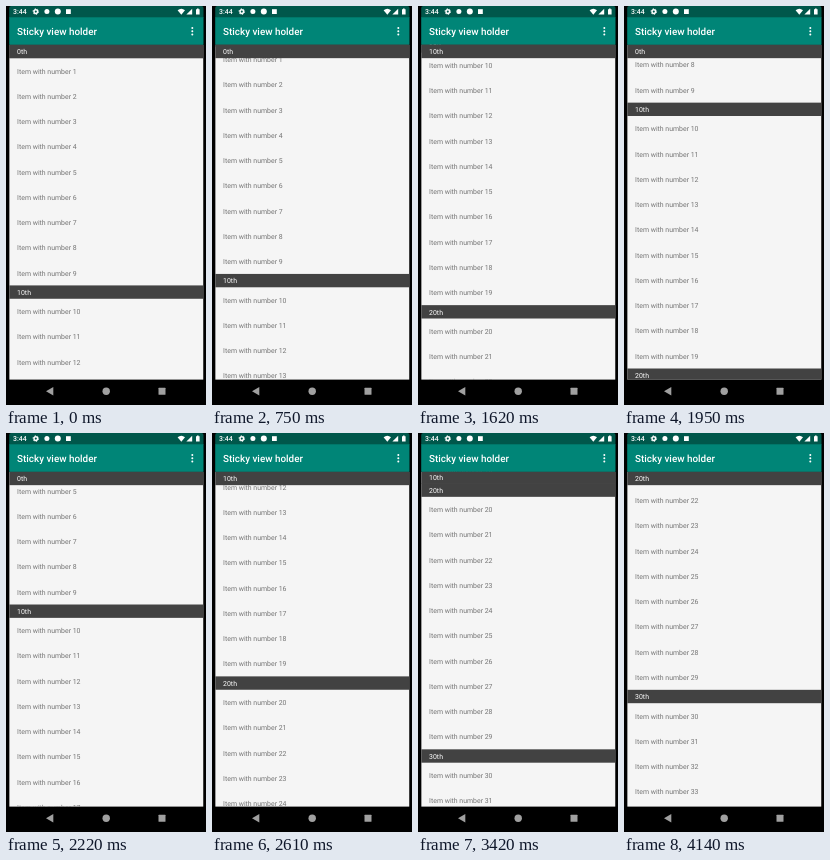
These frames come from a looping animation (200 px wide and 399 px high, 4.92 s). An HTML page:

```html
<!DOCTYPE html>
<html lang="en">
<head>
<meta charset="utf-8">
<title>Sticky view holder</title>
<style>
  html, body { margin: 0; width: 100%; height: 100%; overflow: hidden; background: #000; }
  svg { display: block; }
  text { font: 6.93px Roboto, "Open Sans", sans-serif; text-rendering: geometricPrecision; }
  .light { fill: #fff; }
  .medium { font-weight: 500; }
  .title { font-size: 9.9px; }
  .item { fill: #757575; }
  .head { fill: #424242; }
</style>
</head>
<body>
<svg width="200" height="399" viewBox="0 0 200 399">
  <path fill="#00574b" d="M3.2 12V2Q3.2 0 5.2 0H195.5Q197.5 0 197.5 2V12Z"/>
  <rect x="3.2" y="11.3" width="194.3" height="27.5" fill="#008577"/>
  <text class="light medium" x="7" y="8">3:44</text>
  <text class="light medium title" x="11.1" y="29">Sticky view holder</text>

  <g fill="#fff">
    <circle cx="29.8" cy="5.6" r="1.8" fill="none" stroke="#fff" stroke-width="1.5"/>
    <circle cx="29.8" cy="5.6" r="2.8" fill="none" stroke="#fff" stroke-dasharray="1.2 1.73"/>
    <circle cx="40.9" cy="5.6" r="2.5"/>
    <circle cx="51.8" cy="5.6" r="3"/>
    <rect x="60" y="3.2" width="4.8" height="4.8"/>
    <path d="M171.6 4.3Q175.3 1.3 179 4.3L175.3 8.7Z"/>
    <path d="M180.4 8.5H186.2V2.7Z"/>
    <path d="M190 3.2H191V2.4H192.6V3.2H193.6V8.6H190Z"/>
    <circle cx="186.3" cy="22" r="1"/>
    <circle cx="186.3" cy="25.2" r="1"/>
    <circle cx="186.3" cy="28.4" r="1"/>
  </g>

  <svg x="3.2" y="38.8" width="194.3" height="335" overflow="hidden">
    <rect width="194.3" height="335" fill="#f5f5f5"/>
    <g id="rows"></g>
    <rect id="cover" class="head" width="194.3"/>
    <text id="pinned" class="light" x="7.9"></text>
  </svg>

  <g fill="#a0a0a0">
    <path d="M40 385.2L47.3 381V389.4Z"/>
    <circle cx="100.2" cy="385.2" r="3.7"/>
    <rect x="152.5" y="381.7" width="7" height="7" rx=".5"/>
  </g>
</svg>
<script>
const LOOP = 4920, STEP = 30;
const WIDTH = 194.3, ITEM = 25.25, HEAD = 13.36, INDENT = 7.9;
const DROP = 2.72; // baseline below the middle of a row

const flings = [
  { start: 720, time: 980, by: 252 },
  { start: 1770, time: 570, by: -159.5 },
  { start: 2430, time: 240, by: 239.3 },
  { start: 2820, time: 720, by: 174.9 },
  { start: 3690, time: 300, by: 47.6 }
];

const rows = document.getElementById('rows');
const cover = document.getElementById('cover');
const pinned = document.getElementById('pinned');
const headTops = [];

function add(tag, attrs, text = '') {
  const el = document.createElementNS('http://www.w3.org/2000/svg', tag);
  for (const name in attrs) el.setAttribute(name, attrs[name]);
  el.textContent = text;
  rows.append(el);
}

function addLabel(kind, text, y, height) {
  add('text', { class: kind, x: INDENT, y: y + height / 2 + DROP }, text);
}

function buildRows() {
  let y = 0;
  for (let n = 0; n < 40; n++) {
    if (n % 10 === 0) {
      headTops.push(y);
      add('rect', { class: 'head', y, width: WIDTH, height: HEAD });
      addLabel('light', n + 'th', y, HEAD);
      y += HEAD;
    }
    if (n > 0) {
      addLabel('item', 'Item with number ' + n, y, ITEM);
      y += ITEM;
    }
  }
}

const clamp = u => Math.min(1, Math.max(0, u));
const easeOut = u => 1 - (1 - u) ** 1.5;

function scrollAt(t) {
  return flings.reduce((s, f) => s + f.by * easeOut(clamp((t - f.start) / f.time)), 0);
}

function draw(t) {
  const s = scrollAt(Math.floor(t / STEP) * STEP);
  const k = headTops.findLastIndex(top => top <= s);
  const gap = (headTops[k + 1] ?? Infinity) - s;
  const push = Math.min(0, gap - HEAD);
  rows.setAttribute('transform', `translate(0 ${-s})`);
  // Slight overlap keeps touching headers seamless
  cover.setAttribute('height', Math.min(HEAD, gap + 0.5));
  pinned.setAttribute('y', HEAD / 2 + DROP + push);
  pinned.textContent = k * 10 + 'th';
}

buildRows();
draw(0);
const start = performance.now();
function tick() {
  draw((performance.now() - start) % LOOP);
  requestAnimationFrame(tick);
}
requestAnimationFrame(tick);
</script>
</body>
</html>
```
